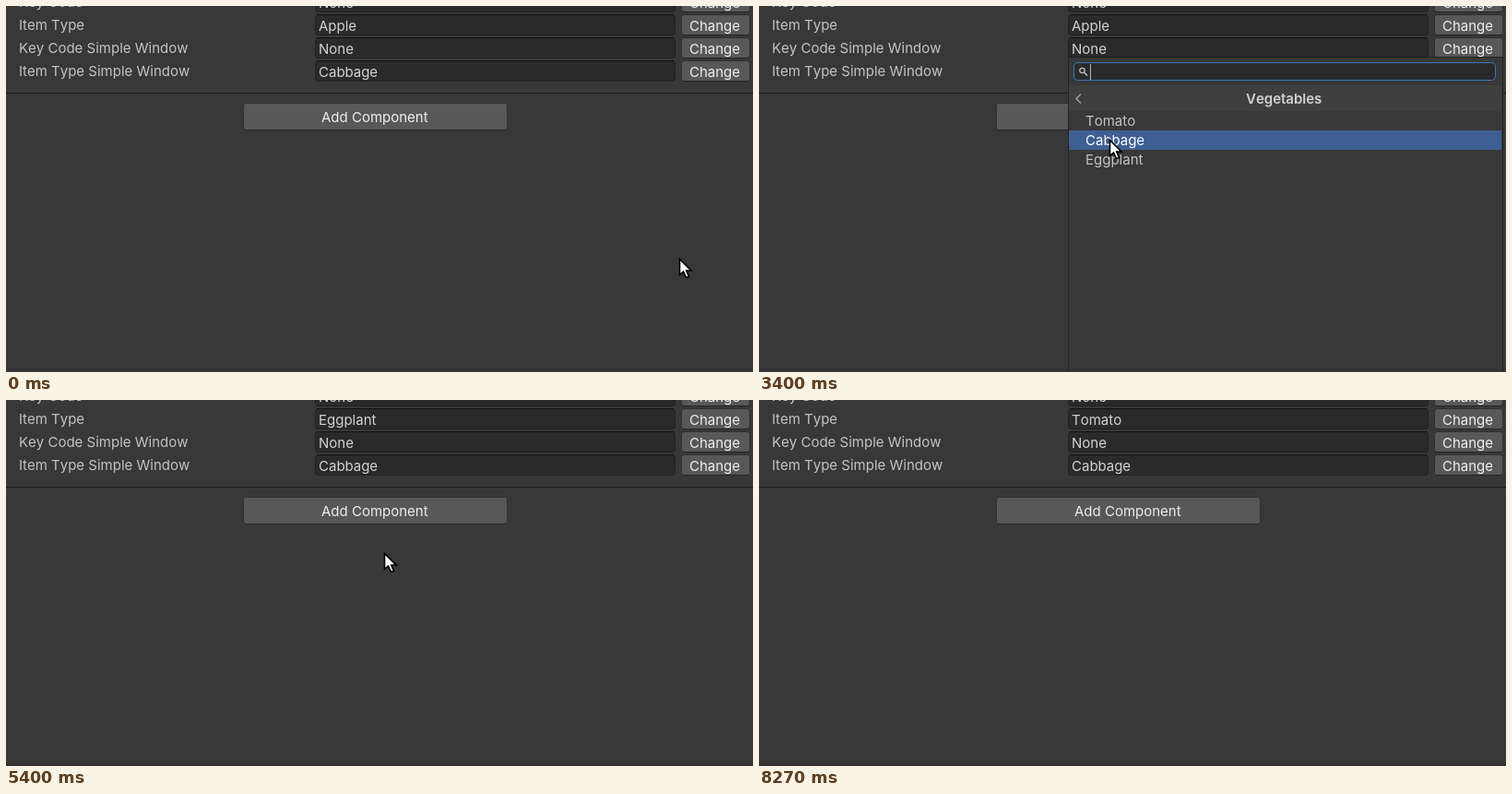
These frames come from a looping animation (810 by 397 pixels, 9000 ms). An HTML page with a canvas:

```html
<!DOCTYPE html>
<html lang="en">
<head>
<meta charset="utf-8">
<title>Item picker</title>
<style>
  html, body { margin: 0; width: 100%; height: 100%; overflow: hidden; background: #383838; }
  canvas { display: block; }
</style>
</head>
<body>
<canvas id="stage" width="810" height="397"></canvas>
<script>
const ctx = document.getElementById('stage').getContext('2d');
const TICKS_PER_SECOND = 15, LOOP_TICKS = 135, SLIDE_TICKS = 3.75;
const POP = { x: 335, y: 56, w: 472, listX: 336, listW: 470, headY: 86, rowY: 114, rowH: 21 };

const MENUS = {
  root: { title: 'ItemType', items: ['Fruits', 'Vegetables'], isRoot: true },
  fruits: { title: 'Fruits', items: ['Apple'] },
  veg: { title: 'Vegetables', items: ['Tomato', 'Cabbage', 'Eggplant'] }
};

// All times below are in ticks.
const VISITS = [
  { open: 18, close: 54, before: 'Apple', picked: 'Cabbage', fromRoot: true },
  { open: 71, close: 81, before: 'Cabbage', picked: 'Eggplant' },
  { open: 96, close: 115, before: 'Eggplant', picked: 'Tomato' }
];
const TO_FRUITS = 33.93, TO_ROOT = 37.8, TO_VEG = 44;

const at = (x, y) => ({ x, y });
const onButton = x => at(x, 21);
const onRow = (i, x) => at(x, POP.rowY + POP.rowH * i + 10);
const onHeader = x => at(x, 102);
const HOME = at(730, 274);
const MOVES = [
  [0, 1, at(731, 274)],
  [5, 16, onButton(757)],
  [17, 29, onRow(0, 353)],
  [33, 36, at(348, 100)],
  [38, 42, onRow(1, 354)],
  [44, 51, onRow(1, 380)],
  [54, 57, at(400, 178)],
  [59, 69, onButton(787)],
  [70, 73, onRow(0, 440)],
  [73, 77, onRow(2, 410)],
  [81, 84, onHeader(387)],
  [86, 92, onButton(741)],
  [95, 101, onRow(2, 455)],
  [103, 104, onRow(1, 452)],
  [107, 108, onHeader(449)],
  [108, 111, onRow(0, 427)],
  [118, 124, at(130, 400)]
];

const smooth = u => u * u * (3 - 2 * u);
const progress = (tick, start, length) =>
  smooth(Math.min(1, Math.max(0, (tick - start) / length)));

function pointerAt(tick) {
  let { x, y } = HOME;
  for (const [start, end, goal] of MOVES) {
    const u = progress(tick, start, end - start);
    x += (goal.x - x) * u;
    y += (goal.y - y) * u;
  }
  return at(Math.round(x), Math.round(y));
}

function slideAt(tick, visit) {
  if (!visit.fromRoot) return 1;
  const part = start => progress(tick, start, SLIDE_TICKS);
  return part(TO_FRUITS) - part(TO_ROOT) + part(TO_VEG);
}

// Replays the hovering since the popup opened; the last row touched stays lit.
function selectedRow(tick, visit) {
  let menu = visit.fromRoot ? MENUS.root : MENUS.veg;
  let row = Math.max(0, menu.items.indexOf(visit.before));
  for (let k = visit.open; k <= tick; k += 0.5) {
    if (menu.isRoot && k >= TO_VEG) {
      menu = MENUS.veg;
      row = 0;
    }
    const hovered = Math.floor((pointerAt(k).y - POP.rowY) / POP.rowH);
    const settled = slideAt(k, visit) === (menu.isRoot ? 0 : 1);
    if (settled && hovered in menu.items) row = hovered;
  }
  return row;
}

function rect(x, y, w, h, color) {
  ctx.fillStyle = color;
  ctx.fillRect(x, y, w, h);
}

function box(x, y, w, h, r, fill, stroke) {
  ctx.beginPath();
  ctx.roundRect(x + .5, y + .5, w - 1, h - 1, r);
  ctx.fillStyle = fill;
  ctx.fill();
  ctx.strokeStyle = stroke;
  ctx.lineWidth = 1;
  ctx.stroke();
}

function text(str, x, y, color = '#c4c4c4', centered = false, weight = 400) {
  ctx.font = `${weight} 15px Inter, sans-serif`;
  ctx.fontKerning = 'none';
  ctx.fillStyle = color;
  const left = centered ? Math.floor(x - ctx.measureText(str).width / 2) : x;
  ctx.fillText(str, left, y);
}

function line(points, color, width) {
  ctx.beginPath();
  points.forEach(([x, y]) => ctx.lineTo(x, y));
  ctx.strokeStyle = color;
  ctx.lineWidth = width;
  ctx.stroke();
}

const chevron = (x, y, dir) =>
  line([[x - 2.5 * dir, y - 5], [x + 2.5 * dir, y], [x - 2.5 * dir, y + 5]], '#a0a0a0', 1.5);

function button(x, y, w, h, label, baseline, pressed) {
  box(x, y, w, h, 3, pressed ? '#46607c' : '#585858', '#303030');
  rect(x + 2, y + h - 1, w - 4, 1, '#242424');
  text(label, x + w / 2, baseline, '#eeeeee', true);
}

function inspector(tick) {
  rect(0, 0, 810, 397, '#383838');
  const done = VISITS.filter(v => tick >= v.close).pop();
  const pressed = VISITS.some(v => tick >= v.open - 2 && tick < v.open);
  const rows = [
    ['Key Code', 'None'],
    ['Item Type', done ? done.picked : VISITS[0].before],
    ['Key Code Simple Window', 'None'],
    ['Item Type Simple Window', 'Cabbage']
  ];
  rows.forEach(([label, value], i) => {
    const y = 9 + (i - 1) * 25;
    text(label, 14, y + 17);
    box(335, y, 391, 23, 3, '#2a2a2a', '#212121');
    rect(337, y, 387, 1, '#101010');
    text(value, 339, y + 18, '#d2d2d2');
    button(732, y, 75, 23, 'Change', y + 18, i === 1 && pressed);
  });
  rect(0, 94, 810, 1, '#1a1a1a');
  button(257, 105, 287, 30, 'Add Component', 126, false);
  rect(0, 393, 810, 4, '#343434');
}

function panel(menu, x, selected, pointer, sliding) {
  const { headY, rowY, rowH, listW } = POP;
  const hovered = pointer.y >= headY && pointer.y < rowY && pointer.x >= x && pointer.x < x + listW;
  rect(x, headY, listW, rowY - headY, hovered ? '#464646' : '#3f3f3f');
  text(menu.title, x + 234, 106, '#d2d2d2', true, 600);
  if (!menu.isRoot && !sliding) chevron(x + 10.5, 100.5, -1);
  menu.items.forEach((item, i) => {
    const y = rowY + i * rowH;
    if (i === selected) rect(x, y, listW, rowH, '#3e5f93');
    text(item, x + 18, y + 16, i === selected ? '#ffffff' : '#c4c4c4');
    if (menu.isRoot) chevron(x + 461, y + 11, 1);
  });
}

function searchField() {
  box(341, 61, 458, 20, 4, '#2a2a2a', '#3a79bb');
  ctx.beginPath();
  ctx.arc(350.5, 70, 2.7, 0, Math.PI * 2);
  ctx.strokeStyle = '#c4c4c4';
  ctx.lineWidth = 1.2;
  ctx.stroke();
  line([[352.5, 72], [356, 75.5]], '#c4c4c4', 1.5);
  rect(359, 63, 1, 17, '#b4b4b4');
}

function popup(tick, visit, pointer) {
  const { x, y, w, listX, listW } = POP;
  const h = 397 - y;
  rect(x, y, w, h, '#383838');
  rect(x, 393, w, 4, '#343434');
  rect(x, y - 1, w, 1, '#232323');
  rect(x, y, 1, h, '#232323');
  rect(x + w - 1, y, 1, h, '#232323');
  searchField();

  const slide = slideAt(tick, visit);
  const sliding = slide > 0 && slide < 1;
  const offset = Math.round(slide * listW);
  const inVeg = !visit.fromRoot || tick >= TO_VEG;
  const row = selectedRow(tick, visit);
  ctx.save();
  ctx.beginPath();
  ctx.rect(sliding ? x : listX, y, sliding ? w : listW - 1, h);
  ctx.clip();
  if (slide < 1) panel(MENUS.root, listX - offset, inVeg ? 1 : row, pointer, sliding);
  if (slide > 0) {
    panel(inVeg ? MENUS.veg : MENUS.fruits, listX + listW - offset, inVeg ? row : 0, pointer, sliding);
  }
  ctx.restore();
}

function arrow({ x, y }) {
  ctx.save();
  ctx.translate(x + .5, y + .5);
  ctx.beginPath();
  [[0, 0], [0, 17], [4, 13.5], [7, 20], [10, 19], [7.3, 12.5], [12.5, 12.5]]
    .forEach(([px, py]) => ctx.lineTo(px, py));
  ctx.closePath();
  ctx.fillStyle = '#ffffff';
  ctx.fill();
  ctx.strokeStyle = '#000000';
  ctx.lineWidth = 1.6;
  ctx.stroke();
  ctx.restore();
}

function draw(ms) {
  const tick = Math.floor((ms + 5) / 1000 * TICKS_PER_SECOND) % LOOP_TICKS;
  const pointer = pointerAt(tick);
  const visit = VISITS.find(v => tick >= v.open && tick < v.close);
  inspector(tick);
  if (visit) popup(tick, visit, pointer);
  arrow(pointer);
}

const start = performance.now();
function frame() {
  draw(performance.now() - start);
  requestAnimationFrame(frame);
}
frame();
</script>
</body>
</html>
```
